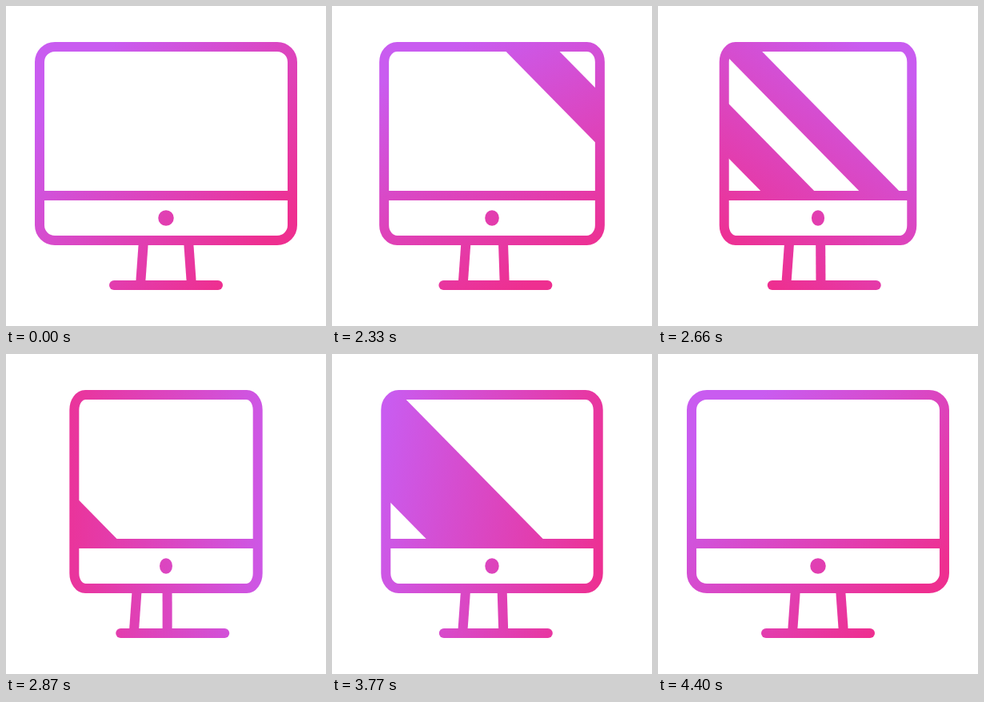
Animation of 400 by 400 pixels, one loop 4.43 s. Source, as an HTML page with a canvas:

```html
<!DOCTYPE html>
<html lang="en">
<head>
<meta charset="utf-8">
<title>Turning monitor</title>
<style>
  html, body { margin: 0; height: 100%; overflow: hidden; background: #fff; }
  canvas { display: block; }
</style>
</head>
<body>
<canvas id="stage" width="400" height="400"></canvas>
<script>
const ctx = document.getElementById('stage').getContext('2d');
const LOOP = 4430;
const SLANT = 0.983; // horizontal run of a shine band per pixel of height

const progress = (t, from, to) => Math.min(1, Math.max(0, (t - from) / (to - from)));
const smooth = u => u * u * (3 - 2 * u);
const mix = (a, b, s) => a + (b - a) * s;

// cubic-bezier(x1, 0, x2, 1), solved by bisection
function bezier(u, x1, x2) {
  let lo = 0, hi = 1;
  for (let i = 0; i < 24; i++) {
    const p = (lo + hi) / 2, q = 1 - p;
    if (3 * p * q * q * x1 + 3 * p * p * q * x2 + p * p * p < u) lo = p;
    else hi = p;
  }
  return smooth(lo);
}

function rotatingGradient(t) {
  const angle = Math.PI * (0.25 + 2 * bezier(progress(t, 2000, LOOP), 0.35, 0.45));
  const dx = 155 * Math.cos(angle), dy = 155 * Math.sin(angle);
  const gradient = ctx.createLinearGradient(200 - dx, 200 - dy, 200 + dx, 200 + dy);
  gradient.addColorStop(0, '#c95cf0');
  gradient.addColorStop(1, '#ee2f90');
  return gradient;
}

function line(x1, y1, x2, y2, cap = 'butt') {
  ctx.lineCap = cap;
  ctx.beginPath();
  ctx.moveTo(x1, y1);
  ctx.lineTo(x2, y2);
  ctx.stroke();
}

// Slanted band; x is its left edge at the middle of the screen
function band(x, width) {
  const top = x - 93 * SLANT, bottom = x + 93 * SLANT;
  ctx.beginPath();
  ctx.moveTo(top, 51);
  ctx.lineTo(top + width, 51);
  ctx.lineTo(bottom + width, 237);
  ctx.lineTo(bottom, 237);
  ctx.fill();
}

function draw(t) {
  const away = bezier(progress(t, 2015, 2950), 0.33, 0.2);
  const back = smooth(progress(t, 3370, 4270));
  const turn = 43.5 * (away - back);
  const half = 158 - turn;

  ctx.fillStyle = '#fff';
  ctx.fillRect(0, 0, 400, 400);
  ctx.fillStyle = ctx.strokeStyle = rotatingGradient(t);
  ctx.lineWidth = 12;

  const frame = new Path2D();
  frame.roundRect(200 - half, 51, 2 * half, 242, { x: 19 * half / 158, y: 19 });

  ctx.save();
  ctx.clip(frame);
  if (t > 2000 && t < 3050) {
    const sweep = smooth(progress(t, 2000, 3050));
    band(mix(438, -135, sweep), 67);
    band(mix(648, -51, sweep), 50);
  } else if (t > 3370 && t < 4270) {
    band(mix(-263, 442, back), 146);
  }
  ctx.restore();

  ctx.stroke(frame);
  line(200 - half, 237, 200 + half, 237);
  ctx.beginPath();
  ctx.ellipse(200, 265, 9.75 - 0.041 * turn, 9.75, 0, 0, 2 * Math.PI);
  ctx.fill();

  const shift = 0.19 * turn;
  line(172 - shift, 293, 168 - shift, 349);
  line(228 - 0.61 * turn, 293, 232 - 0.7 * turn, 349);
  line(135 + shift, 349, 265 + shift, 349, 'round');
}

const start = performance.now();
function tick() {
  draw((performance.now() - start) % LOOP);
  requestAnimationFrame(tick);
}
tick();
</script>
</body>
</html>
```
